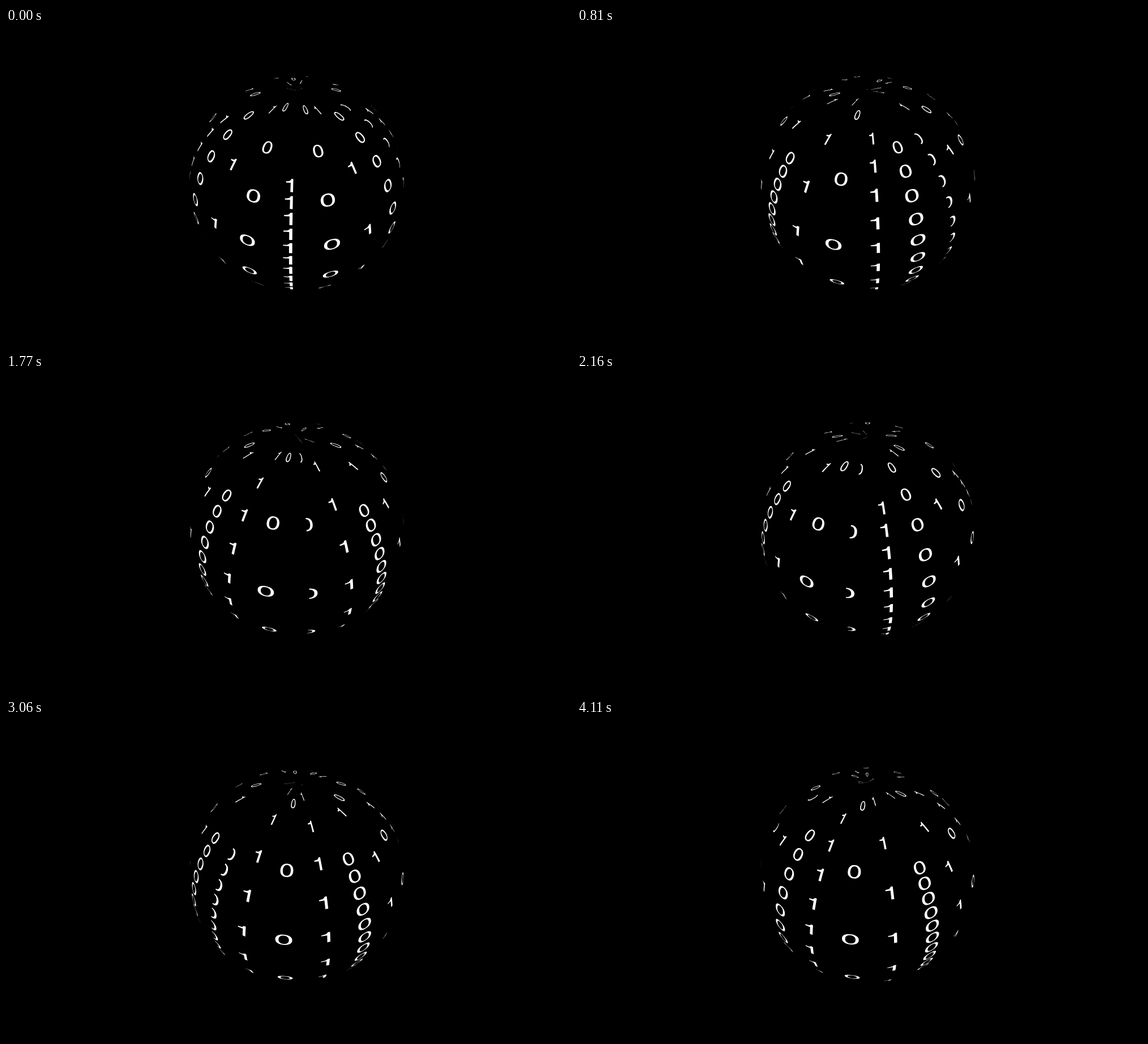
An HTML page with a canvas that plays this animation: 998 px wide and 561 px high, repeating every 4.14 s.

```html
<!DOCTYPE html>
<html lang="en">
<head>
<meta charset="utf-8">
<title>Binary globe</title>
<style>
html, body { margin: 0; width: 100%; height: 100%; overflow: hidden; background: #000; }
canvas { display: block; width: 100vw; height: 100vh; }
</style>
</head>
<body>
<canvas id="stage" width="998" height="561"></canvas>
<script>
const ctx = document.getElementById('stage').getContext('2d');
const RAD = Math.PI / 180;
const LOOP = 4140, STEP = 30;

// globe and camera
const CX = 513.5, CY = 274, R = 189.5;
const EYE = 3.4, FOCAL = Math.sqrt(EYE * EYE - 1);
const TILT = 44 * RAD, SIN_T = Math.sin(TILT), COS_T = Math.cos(TILT);

// digit grid in degrees
const COLS = 19, GAP = 360 / COLS;
const BASE_LAT = 16, TOP_ROW = 4, LOW_ROW = -5;
const EM_LON = 15.8, EM_LAT = 7.35;

// closed superellipse around the glyph centre, in em
function oval(w, h) {
  const pts = [], n = 40;
  const bend = v => Math.sign(v) * Math.pow(Math.abs(v), 2 / 2.25);
  for (let i = 0; i < n; i++) {
    const a = i / n * 2 * Math.PI;
    pts.push([w * bend(Math.cos(a)), h * bend(Math.sin(a))]);
  }
  return pts;
}

// adds points along the edges so that they bend with the globe
function subdivide(pts, n) {
  return pts.flatMap(([x, y], i) => {
    const [x2, y2] = pts[(i + 1) % pts.length];
    return Array.from({ length: n }, (_, k) => [x + (x2 - x) * k / n, y + (y2 - y) * k / n]);
  });
}

const ZERO = [oval(0.233, 0.362), oval(0.143, 0.29)];
const HALF_ZERO = ZERO.map(ring => ring.map(([x, y]) => [Math.max(0, x), y]));
const ONE = [subdivide([
  [0.09, -0.355], [0.09, 0.355], [0.022, 0.355], [-0.002, 0.285],
  [-0.05, 0.235], [-0.162, 0.212], [-0.162, 0.146], [0.002, 0.146], [0.002, -0.355]
], 4)];

function project(lon, lat) {
  const c = Math.cos(lat), up = Math.sin(lat);
  const x = c * Math.sin(lon), front = c * Math.cos(lon);
  const y = up * COS_T - front * SIN_T;
  const z = up * SIN_T + front * COS_T;
  if (z * EYE < 1) return null;
  const k = R * FOCAL / (EYE - z);
  return [CX + x * k, CY - y * k];
}

function addGlyph(glyph, lon, lat) {
  for (const ring of glyph) {
    const pts = ring
      .map(([x, y]) => project((lon + x * EM_LON) * RAD, Math.min(90, lat + y * EM_LAT) * RAD))
      .filter(Boolean);
    if (pts.length < 3) continue;
    pts.forEach(([x, y], i) => i ? ctx.lineTo(x, y) : ctx.moveTo(x, y));
    ctx.closePath();
  }
}

function draw(t) {
  ctx.fillStyle = '#000';
  ctx.fillRect(0, 0, 998, 561);
  ctx.fillStyle = '#fff';
  const spin = 72.45 - 0.0379 * t;
  const phase = 61 - 0.1317 * t;
  for (let i = 0; i < COLS; i++) {
    const glyph = i === 0 ? HALF_ZERO : i % 2 ? ONE : ZERO;
    const space = 18.3 - 11.53 * Math.cos((100 * i - phase) * RAD);
    for (let row = LOW_ROW; row <= TOP_ROW; row++) {
      const lat = BASE_LAT + row * space;
      if (lat > 92 || lat < -45) continue;
      ctx.beginPath();
      addGlyph(glyph, spin + i * GAP, lat);
      ctx.fill('evenodd');
    }
  }
}

const start = performance.now();
function tick() {
  const t = (performance.now() - start) % LOOP;
  draw(Math.floor(t / STEP) * STEP);
  requestAnimationFrame(tick);
}
tick();
</script>
</body>
</html>
```
